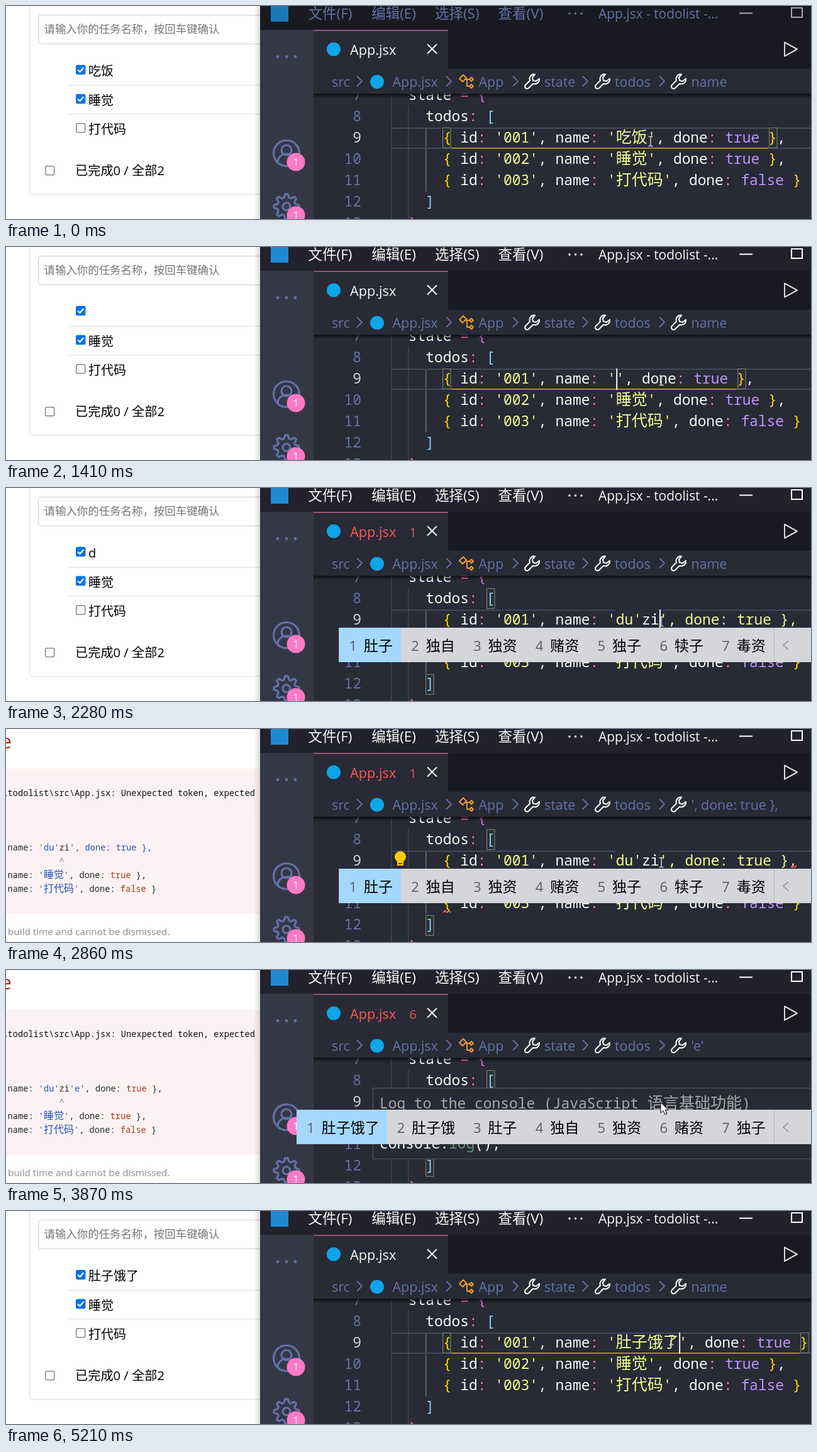
An HTML page with a canvas that plays this animation: 1280x340 px, repeating every 5.29 s.

```html
<!DOCTYPE html>
<html lang="zh-CN">
<head>
<meta charset="utf-8">
<title>todolist</title>
<style>
html, body { margin: 0; width: 100%; height: 100%; overflow: hidden; background: #fff; }
canvas { display: block; }
</style>
</head>
<body>
<canvas id="stage" width="1280" height="340"></canvas>
<script>
const c = document.getElementById('stage').getContext('2d');
const LOOP = 5290;
const SANS = '"Open Sans", "Noto Sans CJK SC", "Noto Sans CJK", sans-serif';
const MONO = '"Noto Sans Mono", "Noto Sans CJK SC", "Noto Sans CJK", monospace';
const BG = '#282a36', BLUE = '#6272a4', WHITE = '#f8f8f2', GOLD = '#ffd700', RED = '#ff5555';
const DARK = { str: '#f1fa8c', op: '#ff79c6', bool: '#bd93f9', plain: WHITE };
const LIGHT = { str: '#2454b8', op: '#24292e', brk: '#24292e', bool: '#a33a1a', plain: '#24292e' };
const CODE_X = 612.3, ADV = 13.745, HAN = 25;
const STR_X = CODE_X + 26 * ADV;

// value of the last [time, value] step that has begun
const at = (t, steps) => steps.reduce((v, s) => t >= s[0] ? s[1] : v, steps[0][1]);
const within = (t, a, b) => t >= a && t < b;
const isHan = ch => ch > '\u2fff';
const widthOf = (s, adv, han) => [...s].reduce((w, ch) => w + (isHan(ch) ? han : adv), 0);

function rect(x, y, w, h, color) {
  c.fillStyle = color;
  c.fillRect(x, y, w, h);
}
function disc(x, y, r, color) {
  c.fillStyle = color;
  c.beginPath();
  c.arc(x, y, r, 0, 7);
  c.fill();
}
function stroke(path, color, width = 2, x = 0, y = 0) {
  c.save();
  c.translate(x, y);
  c.strokeStyle = color;
  c.lineWidth = width;
  c.lineJoin = 'round';
  c.stroke(new Path2D(path));
  c.restore();
}
function box(x, y, w, h, r, color, width = 1) {
  c.strokeStyle = color;
  c.lineWidth = width;
  c.beginPath();
  c.roundRect(x, y, w, h, r);
  c.stroke();
}
function label(s, x, y, size, color, align = 'left', weight = 400) {
  c.font = `${weight} ${size}px ${SANS}`;
  c.fillStyle = color;
  c.textAlign = align;
  c.fillText(s, x, y);
}
// monospaced run in which Chinese characters have their own advance
function mono(s, x, y, color, adv = ADV, han = HAN) {
  const weight = adv === ADV ? 500 : 400;
  c.fillStyle = color;
  c.textAlign = 'left';
  for (const run of s.match(/[\u3000-\uffff]+|[^\u3000-\uffff]+/g) || []) {
    c.font = isHan(run[0]) ? `300 ${han}px ${MONO}` : `${weight} ${adv / 0.6}px ${MONO}`;
    c.fillText(run, x, y);
    x += widthOf(run, adv, han);
  }
  return x;
}
function code(s, x, y, colors, adv, han) {
  for (const tok of s.match(/'[^']*'?|[{}[\]]|[:=]|true|false|\s+|[^'{}[\]:=\s]+/g)) {
    const kind = tok[0] === "'" ? 'str' : /^[{}[\]]/.test(tok) ? 'brk'
      : /^[:=]/.test(tok) ? 'op' : /^(true|false)$/.test(tok) ? 'bool' : 'plain';
    x = mono(tok, x, y, colors[kind], adv, han);
  }
}

function checkbox(x, y, on) {
  if (on) {
    c.fillStyle = '#0b74e5';
    c.beginPath();
    c.roundRect(x, y, 15.5, 15.5, 2.5);
    c.fill();
    stroke('M3.3 8 L6.5 11.2 L12.4 4.4', '#fff', 2.2, x, y);
  } else box(x + .7, y + .7, 14, 14, 2.5, '#767676', 1.3);
}

function listPage(first) {
  box(37.5, -10.5, 500, 311, 5, '#ddd');
  box(51.5, 14.5, 500, 46, 4, '#ccc');
  label('请输入你的任务名称，按回车键确认', 60.5, 43, 17.45, '#757575');
  [[first, true], ['睡觉', true], ['打代码', false]].forEach(([name, done], i) => {
    const y = 94 + i * 46.5;
    checkbox(111, y, done);
    label(name, 131, y + 17, 20, '#000');
    if (i < 2) rect(100, 126 + i * 46, 304, 1, '#ddd');
  });
  checkbox(62, 255, false);
  label('已完成0 / 全部2', 110, 270, 20.2, '#000');
}

function errorPage(str) {
  label('e', 9, 31, 31, '#b3261e', 'right');
  rect(0, 63, 404, 232, '#fdf2f3');
  const row = (s, y) => code(s, 2.6, y, LIGHT, 8.2, 16);
  mono('\\todolist\\src\\App.jsx: Unexpected token, expected', -5.6, 107, '#111', 8.2);
  row(`name: '${str}', done: true },`, 194);
  mono('^', 84.6, 216, '#777', 8.2);
  row("name: '睡觉', done: true },", 238);
  row("name: '打代码', done: false }", 260);
  label('build time and cannot be dismissed.', 3, 329, 15.3, '#878e91');
}

function page(t) {
  rect(0, 0, 404, 340, '#fff');
  if (within(t, 2730, 4270))
    errorPage(at(t, [[0, "du'zi"], [3410, "du'zi'e"], [4140, "du'zi'e'le"]]));
  else if (!within(t, 2600, 2730) && !within(t, 4270, 4410))
    listPage(at(t, [[0, '吃饭'], [1410, ''], [2200, 'd'], [2330, 'du'], [4410, '肚子饿了']]));
  const g = c.createLinearGradient(394, 0, 404, 0);
  g.addColorStop(0, '#0000');
  g.addColorStop(1, '#0002');
  rect(394, 0, 10, 340, g);
}

function titleBar(active) {
  rect(404, 0, 876, 38, active ? '#21222c' : '#191a21');
  const color = active ? WHITE : BLUE, button = active ? '#fff' : '#a5a6b0';
  rect(421, -3, 28, 28, active ? '#1f8ad2' : '#1b78b8');
  ['文件(F)', '编辑(E)', '选择(S)', '查看(V)'].forEach((s, i) =>
    label(s, 480.5 + i * 100.7, 20, 22.5, color, 'left', 500));
  for (const x of [896, 905.5, 915]) disc(x, 12, 1.8, color);
  label('App.jsx - todolist -...', 942, 20, 20.9, color);
  rect(1166, 10.5, 21, 2, button);
  box(1249, 3, 17, 15, 0, button, 2);
}

function activityBar() {
  rect(404, 38, 85, 302, '#343746');
  for (const x of [432, 446, 460]) disc(x, 81, 2.4, BLUE);
  stroke('M-20.5 0 a20.5 20.5 0 1 0 41 0 a20.5 20.5 0 1 0 -41 0 M-8 -5 a8 8 0 1 0 16 0 a8 8 0 1 0 -16 0 M-14 14 a14 13 0 0 1 28 0', BLUE, 3.2, 446, 235);
  let gear = '';
  for (let i = 0; i < 32; i++) {
    const a = (i - 1.5) * Math.PI / 16, r = i % 4 === 1 || i % 4 === 2 ? 20 : 14.5;
    gear += `${i ? 'L' : 'M'}${r * Math.cos(a)} ${r * Math.sin(a)}`;
  }
  stroke(gear + 'Z M6 0 a6 6 0 1 0 -12 0 a6 6 0 1 0 12 0', BLUE, 3.2, 446, 320);
  for (const y of [249, 334]) {
    disc(461, y, 14.5, '#ff79c6');
    label('1', 461, y + 6, 16, '#fff', 'center');
  }
}

function tabs(count) {
  rect(489, 38, 791, 62, '#191a21');
  rect(489, 38, 214, 62, BG);
  rect(489, 38, 214, 2, '#94527c');
  disc(521, 69, 11, '#0ea5e9');
  label('App.jsx', 547, 78, 21.7, count ? RED : WHITE);
  if (count) label(count, 647, 78, 20.5, '#e8534f', 'center');
  stroke('M670 61 L685 76 M685 61 L670 76', WHITE, 2);
  stroke('M1238 58 L1258 69 L1238 80 Z', '#d8d8d4', 2);
}

function breadcrumbs(last) {
  rect(489, 100, 791, 40, BG);
  const g = c.createLinearGradient(0, 140, 0, 147);
  g.addColorStop(0, '#000a');
  g.addColorStop(1, '#0000');
  rect(489, 140, 791, 7, g);
  [['src', 518], ['App.jsx', 614.5], ['App', 751.5], ['state', 856], ['todos', 968], [last, 1089.5]]
    .forEach(([s, x]) => label(s, x, 129, 21.4, BLUE));
  for (const x of [562, 704, 810, 921, 1043]) stroke('M-4 -8 L4 0 L-4 8', BLUE, 1.8, x, 120);
  disc(590, 121, 11, '#0ea5e9');
  stroke('M-11 -4 L-5 -10 L0 -5 L-6 1 Z M-2 -3 H5 M1 -3 V8 H5 M5 -3 l3 -3 l3 3 l-3 3 Z M5 8 l3 -3 l3 3 l-3 3 Z', '#ee9d28', 2, 732, 120);
  for (const x of [837, 949, 1070])
    stroke('M4 -11 a7.5 7.5 0 0 0 -8 10 L-11 6 a3.5 3.5 0 0 0 5 5 L1 4 a7.5 7.5 0 0 0 10 -8 L6 0 L1 -1 L0 -6 Z', WHITE, 2.1, x, 120);
}

function editor(t, str, composing, broken) {
  rect(489, 140, 791, 200, BG);
  rect(612, 140, 1.5, 200, '#41434f');
  rect(639, 159, 1.5, 181, '#41434f');
  rect(667, 194, 1.5, 102, '#5d7688');
  rect(613, 194, 667, 2, '#44475a');
  rect(613, 226, 667, 2, '#44475a');

  const strEnd = STR_X + widthOf(str, ADV, HAN);
  const match = (x, y) => {
    rect(x, y, 13, 32, '#2b3034');
    box(x + .5, y + .5, 12.5, 32, 0, '#85877b');
  };
  if (broken) {
    match(764, 160);
    match(667, 297);
  } else {
    const close = strEnd + 14 * ADV;
    rect(708, 226, close - 708, 1.6, '#bfa21a');
    match(694, 194);
    match(close + 1, 194);
  }
  if (composing) rect(STR_X, 190, strEnd - STR_X, 36, BG);

  const lines = [
    [2, 'state = {', '#da70d6'],
    [4, 'todos: [', '#87cefa'],
    [6, `{ id: '001', name: '${str}', done: true },`, GOLD],
    [6, "{ id: '002', name: '睡觉', done: true },", GOLD],
    [6, "{ id: '003', name: '打代码', done: false }", GOLD],
    [4, ']', '#87cefa'],
    [2, '}', '#da70d6']
  ];
  lines.forEach(([col, s, brk], i) => {
    const y = 150 + i * 34, n = String(i + 7);
    mono(n, 565 - n.length * ADV, y, i === 2 ? '#d0d0cf' : BLUE);
    code(s, CODE_X + col * ADV, y, { ...DARK, brk });
  });

  if (within(t, 2600, 3410)) {
    disc(627, 204, 9, '#ffcc00');
    rect(622, 210, 10, 8, '#ffcc00');
    rect(624, 214, 6, 1.5, BG);
    stroke('M1248 221 l3 -3 l3 3 l3 -3', RED, 1.6);
    stroke('M695 293 l3 -3 l3 3 l3 -3 l3 3', '#ff7b45', 1.6);
  }
  if (within(t, 140, 610) || within(t, 810, 1480) || within(t, 1740, 2860) || t >= 3940)
    rect(strEnd + .5, 194, 2, 34, within(t, 4140, 4810) ? '#8f9096' : WHITE);
}

function suggestion() {
  rect(583, 188, 697, 114, BG);
  box(583.5, 188.5, 720, 113, 0, '#55565c');
  mono('Log to the console (JavaScript 语言基础功能)', 594, 221, '#a9aaa6');
  mono('log', mono('console.', 594, 285, WHITE), 285, '#5f9a70');
  mono('();', 594 + 11 * ADV, 285, WHITE);
}

function candidates(words) {
  const size = w => 54 + 22.4 * w.length;
  let x = 1221 - words.reduce((sum, w) => sum + size(w), 0);
  rect(x, 223, 1280 - x, 55, '#d5d6da');
  words.forEach((w, i) => {
    if (!i) rect(x, 223, size(w), 55, '#a5d7ff');
    label(i + 1, x + 16, 260, 22, '#5c5d62');
    label(w, x + 39.5, 260, 23, '#000');
    x += size(w);
  });
  rect(1221, 223, 1, 55, '#b8b9bd');
  stroke('M1244 244 L1236 251 L1244 258', '#8e8f94', 1.5);
}

function pointer(t) {
  if (within(t, 3410, 3940)) {
    const arrow = 'M0 0 V17 L4 13.5 L7 20 L10 18.5 L7 12.5 H12 Z';
    c.save();
    c.translate(1041, 211);
    c.fillStyle = '#fff';
    c.fill(new Path2D(arrow));
    c.restore();
    stroke(arrow, '#000', 1, 1041, 211);
    return;
  }
  const [x, y] = at(t, [[0, [1025, 216]], [140, [1034, 214]], [210, [1042, 213]], [5210, [1058, 206]]]);
  stroke('M-3.5 -7.5 H-1 L0 -6.5 L1 -7.5 H3.5 M0 -6.5 V6.5 M-3.5 7.5 H-1 L0 6.5 L1 7.5 H3.5', '#d4d4d4', 1.4, x, y);
}

function draw(t) {
  const str = at(t, [[0, '吃饭'], [810, '吃'], [940, ''], [1740, 'd'], [1870, 'du'], [2130, "du'z"],
    [2260, "du'zi"], [3260, "du'zi'e"], [3670, "du'zi'e'l"], [3740, "du'zi'e'le"], [3940, '肚子饿了']]);
  const composing = within(t, 1740, 3940);
  page(t);
  editor(t, str, composing, within(t, 2200, 3940));
  breadcrumbs(at(t, [[0, 'name'], [2600, "', done: true },"], [3410, "'e'"], [3940, 'name']]));
  tabs(at(t, [[0, ''], [2270, '1'], [2930, '6'], [4010, '7'], [4480, '']]));
  titleBar(t >= 70);
  activityBar();
  if (within(t, 3410, 3940)) suggestion();
  if (composing) candidates(at(t, [
    [0, '的 都 对 等 到 但 点'],
    [1870, '读 都 度 独 毒 堵 肚'],
    [2130, '肚子 独自 独资 赌资 独子 犊子 毒资'],
    [3260, '肚子饿了 肚子饿 肚子 独自 独资 赌资 独子']
  ]).split(' '));
  pointer(t);
}

const start = performance.now();
function tick() {
  draw((performance.now() - start) % LOOP);
  requestAnimationFrame(tick);
}
tick();
</script>
</body>
</html>
```
